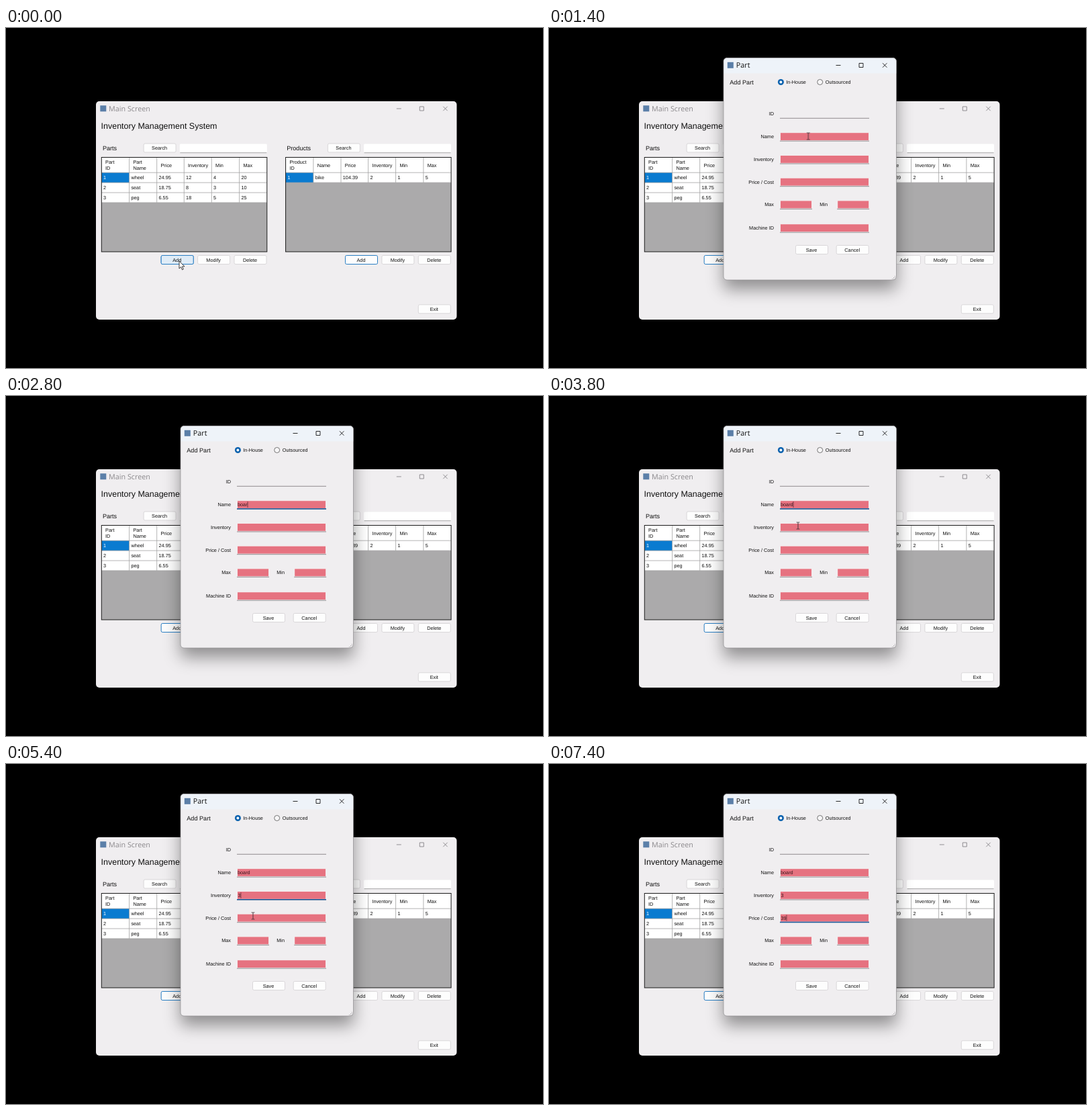
Write an HTML page that moves like this. It is 800 by 506 pixels and loops after 8000 ms.

```html
<!DOCTYPE html>
<html lang="en">
<head>
<meta charset="utf-8">
<title>Inventory form</title>
<style>
html, body { margin: 0; width: 100%; height: 100%; overflow: hidden; background: #000; }
svg { display: block; width: 800px; height: 506px; }
text { font: 7.3px "Liberation Sans", Arial, sans-serif; fill: #111; text-rendering: geometricPrecision; }
.mid { font-size: 9.1px; }
.big { font-size: 12.5px; }
.title { font: 10.8px "Open Sans", "Noto Sans", sans-serif; }
.dim { fill: #8b898c; }
.typed { fill: #3b171e; }
.win { fill: #f0eef0; }
.shadow { filter: drop-shadow(0 14px 12px rgba(0, 0, 0, .4)); }
.btn { fill: #fdfdfd; stroke: #d2d0d2; stroke-width: .8; }
.blue { stroke: #2a7fc4; stroke-width: 1; }
.hover { fill: #dfecf7; }
.pink { fill: #e67280; }
.focus { fill: #1b5c9e; }

.anim { animation: 8s step-end infinite; }
.start { animation-name: start; }
.dialog { animation-name: dialog; }
.beam { animation-name: beam; }
.caret { animation-name: caret; }
.boar { animation-name: boar; }
.board { animation-name: board; }
.stock { animation-name: stock; }
.price1 { animation-name: price1; }
.price2 { animation-name: price2; }
.line1 { animation-name: line1; }
.line2 { animation-name: line2; }
.line3 { animation-name: line3; }

@keyframes start { 0% { opacity: 1 } 10%, 100% { opacity: 0 } }
@keyframes dialog { 0% { opacity: 0 } 10%, 100% { opacity: 1 } }
@keyframes boar { 0% { opacity: 0 } 35%, 100% { opacity: 1 } }
@keyframes board { 0% { opacity: 0 } 37.5%, 100% { opacity: 1 } }
@keyframes stock { 0% { opacity: 0 } 57.5%, 100% { opacity: 1 } }
@keyframes price1 { 0% { opacity: 0 } 87.5%, 100% { opacity: 1 } }
@keyframes price2 { 0% { opacity: 0 } 92.5%, 100% { opacity: 1 } }
@keyframes line1 { 0% { opacity: 0 } 20% { opacity: .5 } 22.5% { opacity: 1 } 52.5% { opacity: .5 } 55%, 100% { opacity: 0 } }
@keyframes line2 { 0% { opacity: 0 } 52.5% { opacity: .4 } 55% { opacity: 1 } 70% { opacity: .5 } 72.5%, 100% { opacity: 0 } }
@keyframes line3 { 0% { opacity: 0 } 70% { opacity: .4 } 72.5%, 100% { opacity: 1 } }
@keyframes beam {
  0% { opacity: 0; transform: translate(400px, 190px) }
  10% { opacity: 1; transform: translate(400px, 190px) }
  12.5% { opacity: 1; transform: translate(395px, 180px) }
  15% { opacity: 1; transform: translate(388px, 163px) }
  17.5% { opacity: 1; transform: translate(386.3px, 161px) }
  35% { opacity: 0; transform: translate(386.3px, 161px) }
  47.5% { opacity: 1; transform: translate(371px, 193px) }
  50% { opacity: 1; transform: translate(370.5px, 195px) }
  57.5% { opacity: 0; transform: translate(370.5px, 195px) }
  62.5% { opacity: 1; transform: translate(368px, 197px) }
  67.5% { opacity: 1; transform: translate(368px, 226px) }
  87.5%, 100% { opacity: 0; transform: translate(368px, 226px) }
}
@keyframes caret {
  0% { opacity: 0; transform: translate(345.5px, 157px) }
  20% { opacity: 1; transform: translate(345.5px, 157px) }
  35% { opacity: 1; transform: translate(360px, 157px) }
  37.5% { opacity: 1; transform: translate(364px, 157px) }
  52.5% { opacity: 1; transform: translate(345.5px, 191px) }
  57.5% { opacity: 1; transform: translate(349.8px, 191px) }
  70% { opacity: 1; transform: translate(345.5px, 224.5px) }
  87.5% { opacity: 1; transform: translate(349.8px, 224.5px) }
  92.5%, 100% { opacity: 1; transform: translate(353.8px, 224.5px) }
}
</style>
</head>
<body>
<svg id="stage" viewBox="0 0 800 506"></svg>
<script>
const text = (x, y, s, cls = '', anchor = 'start') =>
  `<text x="${x}" y="${y}" class="${cls}" text-anchor="${anchor}">${s}</text>`;

const rect = (x, y, w, h, attrs = '') =>
  `<rect x="${x}" y="${y}" width="${w}" height="${h}" ${attrs}/>`;

const path = (d, color, width = 1) =>
  `<path d="${d}" fill="none" stroke="${color}" stroke-width="${width}"/>`;

const button = (x, y, label, cls = '') =>
  rect(x + .5, y + .5, 48, 13, `rx="2" class="btn ${cls}"`) +
  text(x + 24, y + 9.7, label, '', 'middle');

// Minimise, maximise and close; x is the centre of the maximise glyph.
const controls = (x, y, color) => path(
  `M${x - 37.5} ${y}h7M${x - 3} ${y - 3}h6v6h-6zM${x + 32} ${y - 3.2}l6.4 6.4m0 -6.4l-6.4 6.4`, color, .9);

const icon = (x, y) => rect(x, y, 9, 9, 'fill="#5b7fa8"');

const COLS = [0, 41.3, 82.4, 123, 164, 205.3, 246.3];

function grid(x, heads, rows) {
  const bottom = 215.2 + rows.length * 14.9;
  let out = rect(x, 192.5, 246.5, 140.5, 'fill="#abaaab"') +
    rect(x, 192.5, 246.5, bottom - 192.5, 'fill="#fff"') +
    rect(x, 215.2, 41.3, 14.9, 'fill="#0a7bd0"');
  let lines = COLS.slice(1, 6).map(c => `M${x + c} 193V${bottom}`).join('');
  for (let i = 0; i <= rows.length; i++) lines += `M${x} ${215.2 + i * 14.9}h246`;
  out += path(lines, '#a3a1a3', .8);
  heads.forEach((head, c) => {
    const parts = head.split('|');
    parts.forEach((s, i) =>
      out += text(x + COLS[c] + 5.8, (parts.length > 1 ? 202.3 : 207) + i * 9, s));
  });
  rows.forEach((row, r) => row.forEach((s, c) => {
    const picked = !r && !c ? '" style="fill:#fff' : '';
    out += text(x + COLS[c] + 2.8, 225.3 + r * 14.9, s, picked);
  }));
  return out + rect(x, 192.5, 246.5, 140.5, 'fill="none" stroke="#1c1c1c"');
}

const panel = (x, name, heads, rows) =>
  text(x + 1.6, 181.7, name, 'mid') + button(x + 62.3, 171.5, 'Search') +
  rect(x + 116.5, 172.5, 130, 13, 'rx="1.5" fill="#fff"') +
  path(`M${x + 117} 185.7h129`, '#959395', .8) +
  grid(x, heads, rows) +
  button(x + 88.4, 338, 'Add') + button(x + 142.8, 338, 'Modify') + button(x + 197.2, 338, 'Delete');

const field = (x, y, w) =>
  rect(x - 1, y - 1, w + 2, 13, 'rx="1" fill="#f5e9eb"') +
  rect(x, y, w, 10.8, 'class="pink"') +
  path(`M${x - 1} ${y + 12}h${w + 2}`, '#858184', .9);

const radio = (x, on) => on
  ? `<circle cx="${x}" cy="80.5" r="4.5" fill="#0a62ae"/><circle cx="${x}" cy="80.5" r="1.9" fill="#fff"/>`
  : `<circle cx="${x}" cy="80.5" r="4" fill="#f7f6f7" stroke="#666" stroke-width=".9"/>`;

const anim = (cls, body) => `<g class="anim ${cls}">${body}</g>`;
const focusLine = (cls, y) => anim(cls, rect(344, y, 133, 1.5, 'class="focus"'));

const mainWindow =
  rect(134, 109, 537.5, 325, 'rx="5" class="win"') +
  icon(140.3, 115.3) + text(153, 123.8, 'Main Screen', 'title dim') + controls(619.3, 120, '#858386') +
  text(141.5, 150.3, 'Inventory Management System', 'big') +
  panel(142.3, 'Parts',
    ['Part|ID', 'Part|Name', 'Price', 'Inventory', 'Min', 'Max'],
    [['1', 'wheel', '24.95', '12', '4', '20'],
     ['2', 'seat', '18.75', '8', '3', '10'],
     ['3', 'peg', '6.55', '18', '5', '25']]) +
  panel(416.6, 'Products',
    ['Product|ID', 'Name', 'Price', 'Inventory', 'Min', 'Max'],
    [['1', 'bike', '104.39', '2', '1', '5']]) +
  button(613.8, 411.3, 'Exit') +
  button(230.7, 338, 'Add', 'blue') +
  anim('start',
    button(230.7, 338, 'Add', 'blue hover') + button(505, 338, 'Add', 'blue') +
    '<path d="M258 346.8v11.2l2.6-2.4 1.9 4.2 1.8-.8-1.9-4.1h3.6z" fill="#fff" stroke="#111" stroke-width=".8"/>');

const rows = [['Name', 156.2], ['Inventory', 190], ['Price / Cost', 223.7], ['Max', 257.4], ['Machine ID', 292.2]];

let grip = '';
for (let i = 0; i < 3; i++)
  for (let j = 0; j <= i; j++) grip += rect(515 - j * 2, 369 + i * 2, 1, 1, 'fill="#a5a3a5"');

const dialog =
  rect(260, 44.5, 257.5, 330.5, 'rx="5" class="win shadow"') +
  '<path d="M260 67.5V49.5a5 5 0 0 1 5-5H512.5a5 5 0 0 1 5 5V67.5z" fill="#eef3f9"/>' +
  rect(260, 44.5, 257.5, 330.5, 'rx="5" fill="none" stroke="#8d8b8e" stroke-width=".7"') +
  icon(265.8, 50.8) + text(278.8, 59.2, 'Part', 'title') + controls(465, 55.5, '#151515') +
  text(269.3, 83.9, 'Add Part', 'mid') +
  radio(345.4, true) + text(353.3, 83.2, 'In-House') +
  radio(403.7, false) + text(411.8, 83.2, 'Outsourced') +
  text(335, 130.4, 'ID', '', 'end') + path('M344 134.3h133', '#858184', .9) +
  rows.map(([label, y]) =>
    text(335, y + 8, label, '', 'end') +
    (label === 'Max'
      ? field(345, y, 46) + text(403.2, y + 8, 'Min') + field(430.2, y, 46)
      : field(345, y, 131))).join('') +
  button(367, 323, 'Save') + button(427.7, 323, 'Cancel') + grip +
  focusLine('line1', 167.2) + focusLine('line2', 201) + focusLine('line3', 234.7) +
  anim('boar', text(345, 164.1, 'boar', 'typed')) +
  anim('board', text(359.6, 164.1, 'd', 'typed')) +
  anim('stock', text(345.4, 197.9, '3', 'typed')) +
  anim('price1', text(345.4, 231.6, '3', 'typed')) +
  anim('price2', text(349.5, 231.6, '9', 'typed')) +
  anim('caret', path('M0 0v9', '#5a2a33', .8)) +
  anim('beam', path('M-2.3 -5h1.6l.7 .6 .7 -.6h1.6M0 -4.6V4.6M-2.3 5h1.6l.7 -.6 .7 .6h1.6', '#3a3035', .9));

document.getElementById('stage').innerHTML = mainWindow + anim('dialog', dialog);
</script>
</body>
</html>
```
